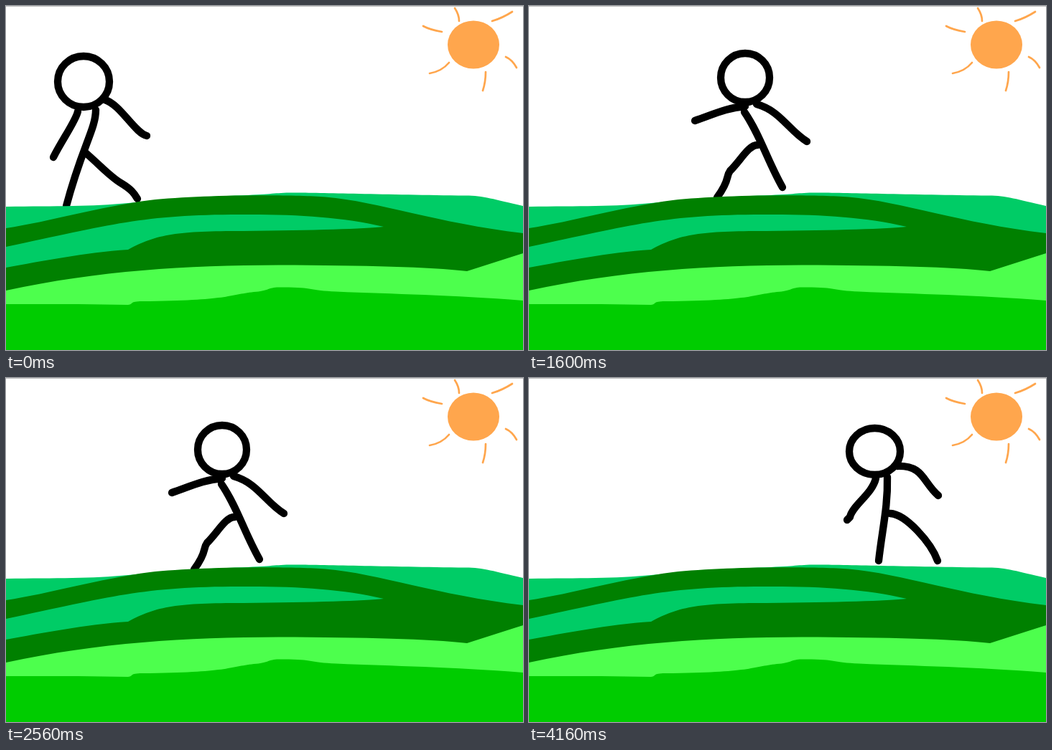
Animation, 720 px wide and 480 px high, one loop 4800 ms. Source, as an HTML page with a canvas:

```html
<!DOCTYPE html>
<html lang="en">
<head>
<meta charset="utf-8">
<title>Walk over the hills</title>
<style>
  html, body { margin: 0; width: 100%; height: 100%; overflow: hidden; background: #fff; }
  canvas { display: block; }
</style>
</head>
<body>
<canvas id="stage" width="720" height="480"></canvas>
<script>
const ctx = document.getElementById('stage').getContext('2d');
const POSE_MS = 1600;
const curve = (...parts) => new Path2D(parts.join(' '));

// Painted back to front.
const hills = [
  { color: '#00cc66', shape: curve(
    'M0 280 C70 279 120 280 170 275 S270 266 320 264.5 S370 261 395 260.5',
    'S520 263 640 264.5 C665 264.5 680 270 720 279 V480 H0') },
  { color: '#4dff4d', shape: curve('M0 390 Q300 330 642 366 L720 345 V480 H0') },
  { color: '#008000', shape: curve(
    'M0 310 C60 301 130 280 200 271 C270 263 400 263 445 266.5 C520 273 600 303 720 317',
    'V345 L642 370 C590 364 500 362 380 361.5 C250 362 130 369 0 397',
    'V365 C50 356 110 344 170 340 C210 318 240 314 330 314 C430 313 500 311 526 308',
    'C470 295 410 291 340 291 C195 290 150 304 0 336') },
  { color: '#00cc00', shape: curve(
    'M0 416 H100 L170 417 C178 416 171 412 190 412 C310 411 310 403 345 399',
    'C365 398 365 392.5 380 392.5 C430 392 420 397 460 398.5 C540 402 620 403 720 411',
    'V480 H0') }
];

const rays = curve(
  'M625 3 Q631 12 631 21', 'M677 21 Q691 17 705 8', 'M581 28 Q590 33 607 36',
  'M590 94 Q607 91 617 79', 'M668 92 Q668 106 664 118', 'M696 71 Q705 75 711 86');

// Limbs run: back arm, body, front leg or arm, remaining limb.
const poses = [
  { head: [108, 105.5, 36, 35.5], limbs: curve(
    'M100 147 C98 159 78 187 66 211', 'M125 145 C125 172 106 196 84 279',
    'M138 131 C160 138 180 178 196 181', 'M110 204 C135 226 145 238 160 247 S179 262 183 269') },
  { head: [301, 100, 34, 34], limbs: curve(
    'M301 140 C275 142 255 152 231 160', 'M300 148 C322 180 332 216 353 253',
    'M317 137 C350 146 362 174 387 189', 'M318 194 C306 194 295 215 280 230 C274 238 280 243 262 267') },
  { head: [481.5, 102.5, 35.5, 32.5], limbs: curve(
    'M483 140 C478 162 450 178 447 194 L443 198', 'M499 138 C500 180 492 210 487 255',
    'M513 123 C550 122 548 145 570 164', 'M503 189 C525 190 560 230 569 255') }
];

function ellipse(x, y, rx, ry) {
  const path = new Path2D();
  path.ellipse(x, y, rx, ry, 0, 0, Math.PI * 2);
  return path;
}

function fill(color, shape) {
  ctx.fillStyle = color;
  ctx.fill(shape);
}

function stroke(color, width, shape) {
  ctx.strokeStyle = color;
  ctx.lineWidth = width;
  ctx.stroke(shape);
}

function render(time) {
  const { head, limbs } = poses[Math.floor(time / POSE_MS) % poses.length];
  ctx.fillStyle = '#fff';
  ctx.fillRect(0, 0, 720, 480);
  ctx.fillStyle = '#c0c0c0';
  ctx.fillRect(0, 0, 720, 1);
  fill('#ffa64d', ellipse(651, 54, 36, 33.5));
  stroke('#ffa64d', 2.7, rays);
  stroke('#000', 10.3, ellipse(...head));
  stroke('#000', 10.3, limbs);
  hills.forEach(({ color, shape }) => fill(color, shape));
}

ctx.lineCap = ctx.lineJoin = 'round';
const start = performance.now();
function tick() {
  render(performance.now() - start);
  requestAnimationFrame(tick);
}
tick();
</script>
</body>
</html>
```
